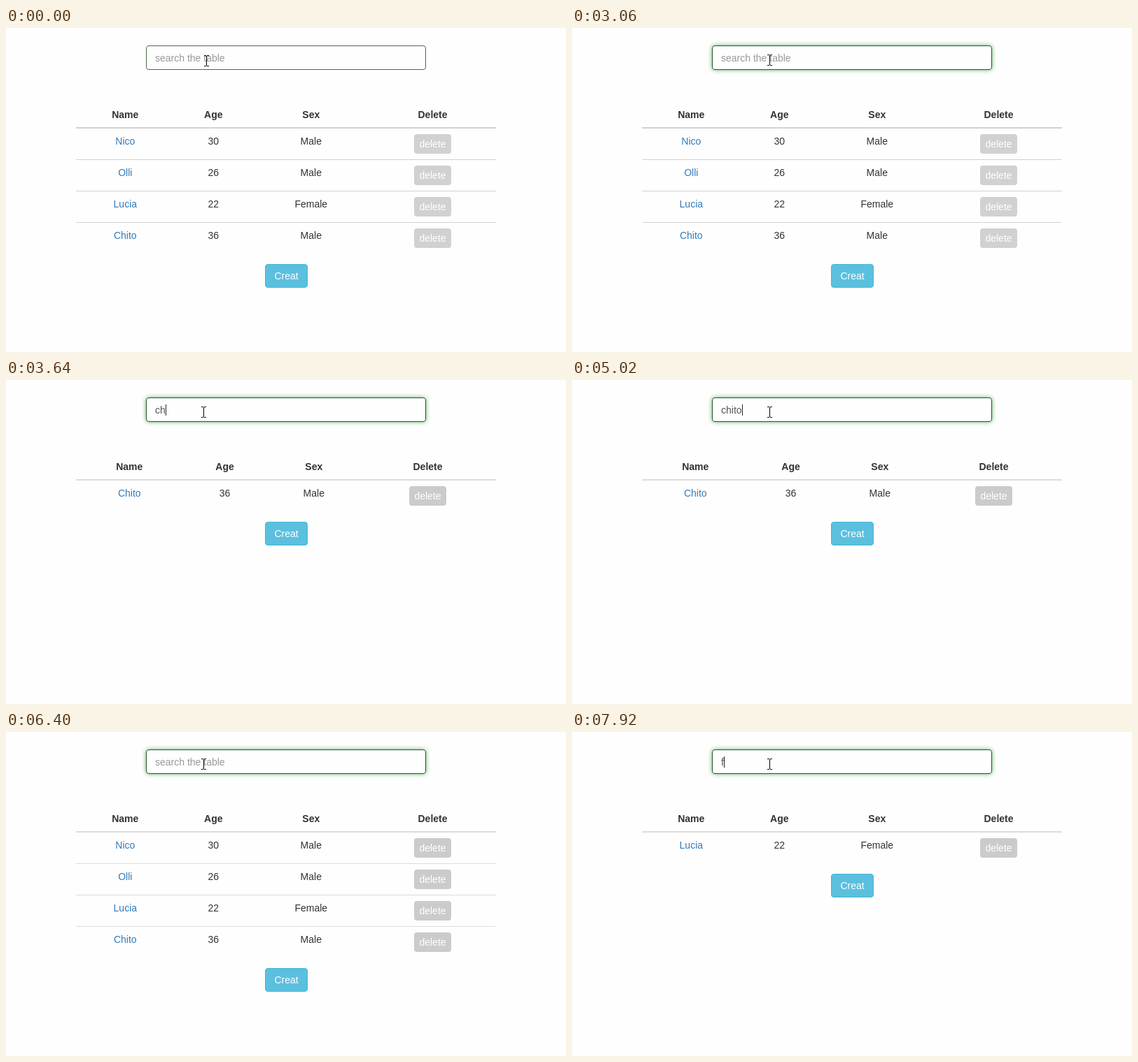
These frames come from a looping animation (800x464 px, 8000 ms). An HTML page:

```html
<!DOCTYPE html>
<html lang="en">
<head>
<meta charset="utf-8">
<title>Searchable table</title>
<style>
html, body { margin: 0; width: 100%; height: 100%; overflow: hidden; background: #fefefe; }
body { font: 14px/20px "Liberation Sans", Arial, sans-serif; color: #333; position: relative; }
div, #cursor, #hint { position: absolute; box-sizing: border-box; white-space: nowrap; }
#search { left: 200px; top: 25px; width: 400px; height: 35px; padding: 7px 12px; color: #555;
  border: 1px solid; border-radius: 4px; }
#hint { left: 12px; top: 7px; color: #999; }
#caret { display: inline-block; width: 1px; height: 16px; margin-right: -1px; vertical-align: -3px; background: #222; }
.cell { width: 100px; text-align: center; }
.head { font-weight: bold; }
.link { color: #337ab7; }
.line { left: 100px; width: 600px; background: var(--line); }
.button { border-radius: 4px; color: #fff; text-align: center; }
.delete { width: 53px; height: 28px; line-height: 28px; background: var(--delete); }
#create { left: 370px; width: 61px; height: 34px; line-height: 32px; background: #5bc0de; border: 1px solid #46b8da; }
</style>
</head>
<body>
<div id="search"><span id="hint">search the table</span><span id="typed"></span><span id="caret"></span></div>
<div id="table"></div>
<div id="create" class="button">Creat</div>
<svg id="cursor" width="7" height="16"><path d="M0 .5h3m1 0h3M3.5 1v14M0 15.5h3m1 0h3" stroke="#000" fill="none"/></svg>
<script>
const LOOP = 8000;
const people = [
  ["Nico", 30, "Male"],
  ["Olli", 26, "Male"],
  ["Lucia", 22, "Female"],
  ["Chito", 36, "Male"]
];
const wide = [170.3, 296.3, 435.8, 609.5];
const narrow = [176.3, 312.5, 439.8, 602.5];

// [start, query, caret shown]
const typing = [
  [0, "", 0], [1540, "", 1], [2130, "", 0], [2530, "", 1], [3060, "", 0],
  [3490, "c", 1], [3640, "ch", 1], [4220, "ch", 0], [4500, "chi", 1], [4750, "chit", 1], [5020, "chito", 1],
  [5450, "chi", 1], [5570, "ch", 1], [5690, "c", 0], [5840, "", 1], [6400, "", 0],
  [6960, "f", 1], [7490, "f", 0], [7920, "f", 1]
];
// [start, x, y]
const pointer = [[0, 283, 39], [710, 283, 38], [830, 282, 38], [980, 279, 38]];
// [start, border colour, glow]
const focus = [
  [0, "#4b6a4d", "none"],
  [1540, "#366638", "0 0 6px #67b168"],
  [1690, "#2b542c", "0 0 6px #67b168"]
];
// [start, line colour, delete button colour]
const tones = [[0, "#d1d1d1", "#d1d1d1"], [3490, "#dcdcdc", "#cbcbcb"]];

const $ = id => document.getElementById(id);
const at = (steps, t) => steps.findLast(s => s[0] <= t);
const cell = (text, x, y, kind = "") =>
  `<div class="cell ${kind}" style="left:${x - 50}px;top:${y}px">${text}</div>`;
const line = (y, h) => `<div class="line" style="top:${y}px;height:${h}px"></div>`;

function drawTable(query) {
  const rows = people.filter(p => p.join(" ").toLowerCase().includes(query));
  const cols = rows.length === 1 && rows[0][2] === "Male" ? narrow : wide;
  let html = ["Name", "Age", "Sex", "Delete"].map((h, i) => cell(h, cols[i], 114, "head")).join("") + line(142, 2);
  rows.forEach((row, r) => {
    const y = 152 + 45 * r;
    if (r) html += line(y - 9, 1);
    html += row.map((v, i) => cell(v, cols[i], y, i ? "" : "link")).join("");
    html += `<div class="button delete" style="left:${cols[3] - 26.5}px;top:${y}px">delete</div>`;
  });
  // The cells are placed in stage coordinates.
  $("table").innerHTML = html;
  $("create").style.top = 158 + 45 * rows.length + "px";
}

let shown = null;
function frame() {
  const t = performance.now() % LOOP;
  const [, query, caret] = at(typing, t);
  const [, x, y] = at(pointer, t);
  const [, border, glow] = at(focus, t);
  const [, rule, fill] = at(tones, t);
  if (query !== shown) drawTable(shown = query);
  $("typed").textContent = query;
  $("hint").style.display = query ? "none" : "";
  $("caret").style.visibility = caret ? "visible" : "hidden";
  $("cursor").style.left = x + "px";
  $("cursor").style.top = y + "px";
  $("search").style.borderColor = border;
  $("search").style.boxShadow = glow;
  document.body.style.setProperty("--line", rule);
  document.body.style.setProperty("--delete", fill);
  requestAnimationFrame(frame);
}
$("table").style.cssText = "left:0;top:0";
frame();
</script>
</body>
</html>
```
